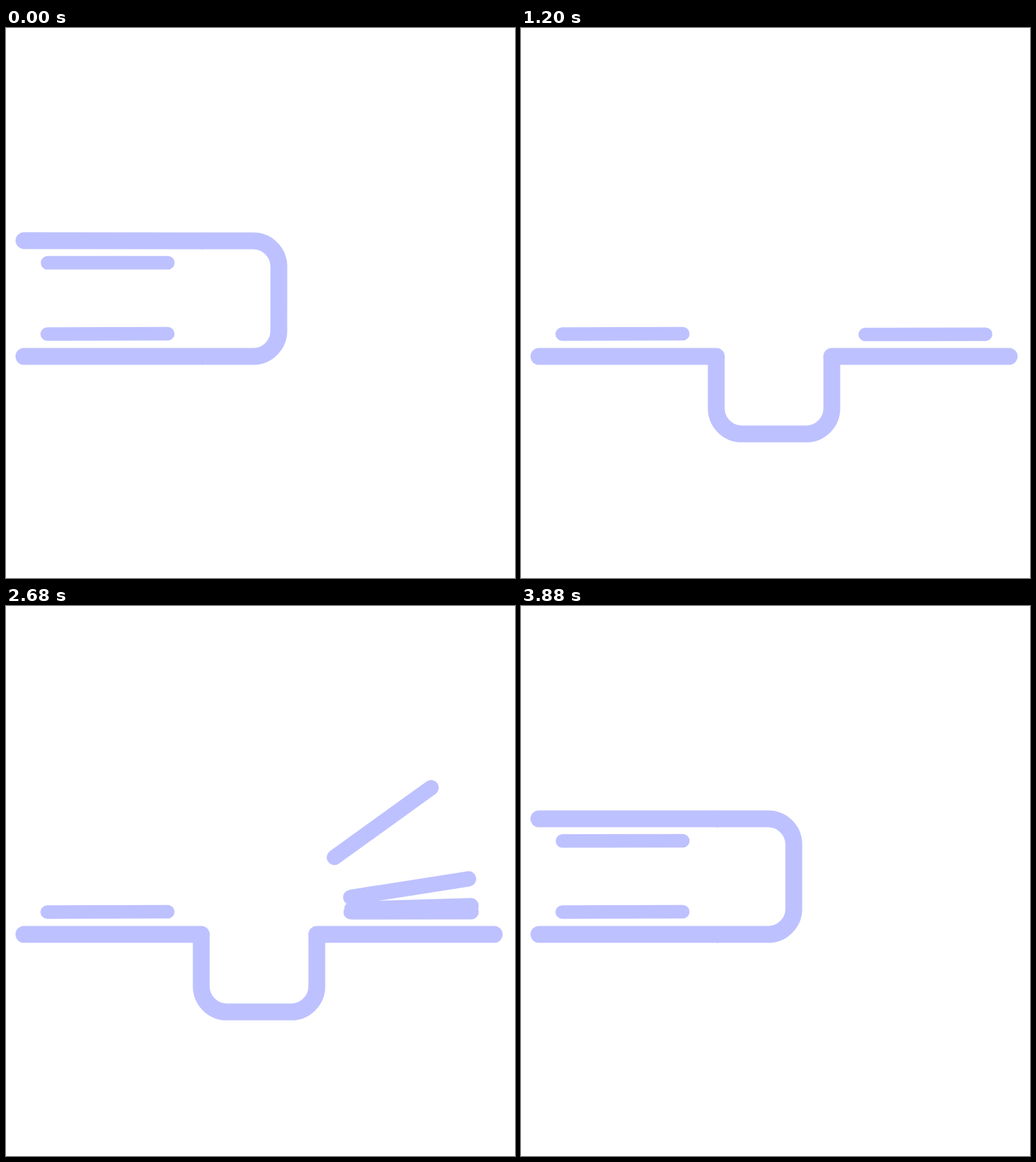
Recreate the animation shown at these times as an HTML page. Size 696 by 752 pixels, loop 4080 ms.

```html
<!DOCTYPE html>
<html lang="en">
<head>
<meta charset="utf-8">
<title>Book loader</title>
<style>
  html, body { margin: 0; width: 100%; height: 100%; overflow: hidden; background: #fff; }
  svg { display: block; width: 100%; height: 100%; }
  path { fill: none; stroke: #bdc1ff; }
  .cover { stroke-width: 23; stroke-linecap: round; }
  .spine { stroke-width: 23; }
  .sheet { stroke-width: 18.6; stroke-linecap: round; }
  .page { stroke-width: 21; stroke-linecap: round; }
</style>
</head>
<body>
<svg viewBox="0 0 696 752">
  <g id="book">
    <path class="spine" d="M267 449V520A35 35 0 0 0 302 555H390A35 35 0 0 0 425 520V449"/>
    <g id="left">
      <path class="cover" d="M24.5 449H267"/>
      <path class="sheet" d="M56.4 418.5L221.2 418"/>
    </g>
    <g id="right">
      <path class="cover" d="M425 449H667.5"/>
      <path class="sheet" d="M470.8 419L635.2 418.7"/>
    </g>
  </g>
  <g id="pages"></g>
</svg>
<script>
const LOOP = 4080, STEP = 40;
const HALF = 2200;           // the second pass mirrors the first
const FOLD = 360;            // time to open or close the covers
const OPEN = [-12, 2164.5], CLOSE = [1299.2, 3514];
const COUNT = 11, TURN = 330, GAP = 360 / 7, FIRST = 327.9;
const HINGE_L = '267 449', HINGE_R = '425 449';

const get = id => document.getElementById(id);
const book = get('book'), left = get('left'), right = get('right');

const pages = Array.from({ length: COUNT }, () => {
  const page = document.createElementNS('http://www.w3.org/2000/svg', 'path');
  page.setAttribute('class', 'page');
  page.setAttribute('d', 'M56 418H219');
  return get('pages').appendChild(page);
});

// Closed form of cubic-bezier(1, 0, 0, 1)
function ease(x) {
  const u = Math.min(1, Math.max(0, x));
  const t = 0.5 + Math.cbrt((u - 0.5) / 4);
  return t * t * (3 - 2 * t);
}

function rotate(el, deg, pivot) {
  el.setAttribute('transform', `rotate(${deg} ${pivot})`);
}

function foldAngle(t) {
  const opened = i => ease((t - OPEN[i]) / FOLD) - ease((t - CLOSE[i]) / FOLD);
  return 90 * (1 - opened(0) - opened(1));
}

function draw(t) {
  const fold = foldAngle(t);
  const toRight = t > 800 && t < 3000;
  rotate(book, toRight ? fold : -fold, toRight ? HINGE_R : HINGE_L);
  rotate(left, fold, HINGE_L);
  rotate(right, -fold, HINGE_R);

  const back = t >= HALF - 200;
  const local = back ? t - HALF : t;
  pages.forEach((page, i) => {
    const u = (local - FIRST - i * GAP) / TURN;
    const turned = 180 * ease(u);
    page.style.display = u > -0.08 && u < 0.92 ? '' : 'none';
    rotate(page, back ? 180 - turned : turned, '346 418');
  });
}

const start = performance.now();
function tick() {
  const t = (performance.now() - start) % LOOP;
  draw(Math.floor(t / STEP) * STEP);
  requestAnimationFrame(tick);
}
tick();
</script>
</body>
</html>
```
